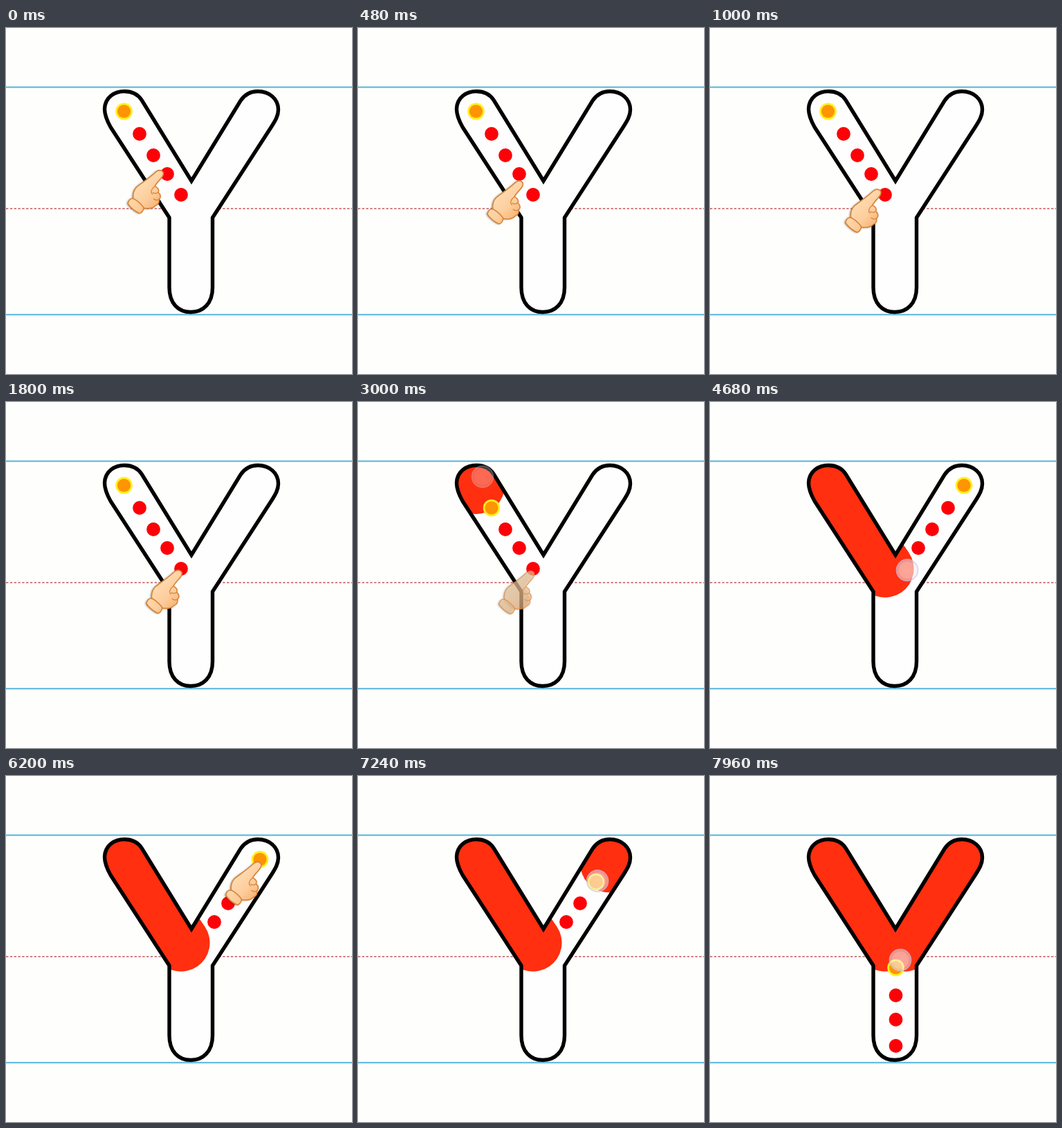
An HTML page with a canvas that plays this animation: 500 by 500 pixels, repeating every 8 s.

```html
<!DOCTYPE html>
<html lang="en">
<head>
<meta charset="utf-8">
<title>Letter tracing</title>
<style>
html, body { margin: 0; width: 100%; height: 100%; overflow: hidden; background: #fefefc; }
canvas { display: block; width: 100vw; height: 100vh; object-fit: contain; }
</style>
</head>
<body>
<canvas id="stage" width="500" height="500"></canvas>
<script>
const ctx = document.getElementById('stage').getContext('2d');
const LOOP = 8000;
const TAU = Math.PI * 2;
const BRUSH = 41.5;
const LAG = 30;

const letter = new Path2D(
  'M236 274 L151 143 C146 134 142.5 126 142.5 117 C143 100 157 91.5 171 91.5 ' +
  'C181 91.5 190 95 196 104 L268 221 L339 105 C345 96 354 91.5 364 91.5 ' +
  'C380 91.5 393.5 102 393.5 118 C393.5 127 389 134 384 142 L298.5 274 L298.5 375 ' +
  'C298.5 398 285 410.5 267 410.5 C249 410.5 236 398 236 375 Z');

// Hand shapes, relative to the top right of the fingertip
const cuff = new Path2D(
  'M-46 42 C-42 41 -30 52 -29 56 C-30 60 -33 64 -36 63 C-42 60 -49 54 -52 49 C-51 46 -49 42 -46 42 Z');
const palm = new Path2D(
  'M-11 3 C-6 -1 1 2 -1 8 C-2 12 -9 17 -13 24 C-9 26 -6 29 -8 33 C-4 36 -4 41 -7 43 ' +
  'C-6 47 -8 51 -12 52 C-16 57 -25 57 -31 55 L-44 43 C-45 36 -43 29 -39 25 C-33 20 -23 14 -11 3 Z');
const creases = new Path2D(
  'M-13 24 C-18 28 -20 33 -16 36 M-8 33 C-11 35 -14 35 -16 33 M-7 43 C-10 45 -13 44 -15 42');

// Each stroke: its dots, and the touch that traces it
const strokes = [
  { dots: [[170.5, 120.5], [193, 153], [213, 184], [233, 211], [253, 241]],
    from: [180, 108], to: [285, 243], show: 0, down: 2880, drag: 3680, done: 4640 },
  { dots: [[367, 120.5], [344, 153], [321, 184], [301, 211]], end: [281, 241],
    from: [372, 110], to: [275, 266], show: 4640, down: 6600, drag: 7000, done: 7900 },
  { dots: [[268.5, 277], [268.5, 317], [268.5, 352], [268.5, 390]],
    show: 7900, down: LOOP, drag: LOOP, done: LOOP }
];

const clamp = v => Math.min(1, Math.max(0, v));
const ramp = (t, a, b) => clamp((t - a) / (b - a));
const mix = (a, b, k) => [a[0] + (b[0] - a[0]) * k, a[1] + (b[1] - a[1]) * k];
const dist = (a, b) => Math.hypot(b[0] - a[0], b[1] - a[1]);

function disc([x, y], r, color) {
  ctx.fillStyle = color;
  ctx.beginPath();
  ctx.arc(x, y, r, 0, TAU);
  ctx.fill();
}

function rule(y, color, width, dash = []) {
  ctx.strokeStyle = color;
  ctx.lineWidth = width;
  ctx.setLineDash(dash);
  ctx.beginPath();
  ctx.moveTo(0, y);
  ctx.lineTo(500, y);
  ctx.stroke();
  ctx.setLineDash([]);
}

const touchAt = (s, t) => mix(s.from, s.to, ramp(t, s.drag, s.done));

// Distance of the touch along the line of the stroke
function progress(s, t) {
  const a = s.dots[0], b = s.end || s.dots[s.dots.length - 1];
  const p = touchAt(s, t), len = dist(a, b);
  return ((p[0] - a[0]) * (b[0] - a[0]) + (p[1] - a[1]) * (b[1] - a[1])) / len;
}

function drawFill(s, t) {
  if (t < s.down || !s.to) return;
  const a = s.dots[0], b = s.end || s.dots[s.dots.length - 1];
  const k = t >= s.done ? 1 : clamp((progress(s, t) - LAG) / dist(a, b));
  const p = mix(a, b, k);
  ctx.strokeStyle = '#ff2f0f';
  ctx.lineWidth = BRUSH * 2;
  ctx.lineCap = 'round';
  ctx.beginPath();
  ctx.moveTo(...a);
  ctx.lineTo(p[0] + 0.01, p[1]);
  ctx.stroke();
  ctx.lineCap = 'butt';
}

function drawDots(s, t) {
  if (t < s.show || t >= s.done) return;
  const reach = t < s.down ? -1 : Math.max(0, progress(s, t));
  const left = s.dots.filter(d => dist(s.dots[0], d) > reach);
  left.forEach((d, i) => {
    if (i) return disc(d, 9.9, '#fd0008');
    disc(d, 12.3, '#fff01c');
    disc(d, 9.6, '#ff9404');
  });
}

function drawHand([x, y], alpha) {
  if (alpha <= 0) return;
  ctx.save();
  ctx.globalAlpha = alpha;
  ctx.translate(x, y);
  ctx.lineJoin = 'round';
  ctx.lineWidth = 1.6;
  ctx.strokeStyle = '#d98538';
  const skin = ctx.createLinearGradient(-40, 22, -10, 52);
  skin.addColorStop(0, '#ffdcb2');
  skin.addColorStop(0.6, '#fdcd9c');
  skin.addColorStop(1, '#f7b577');
  ctx.fillStyle = skin;
  for (const part of [palm, cuff]) {
    ctx.shadowColor = 'rgba(60,50,40,.6)';
    ctx.shadowBlur = 3;
    ctx.shadowOffsetX = -1.5;
    ctx.shadowOffsetY = 0.5;
    ctx.fill(part);
    ctx.shadowColor = 'transparent';
    ctx.stroke(part);
  }
  ctx.lineWidth = 1.3;
  ctx.stroke(creases);
  ctx.restore();
}

function drawTouch([x, y], alpha) {
  if (alpha <= 0) return;
  ctx.save();
  ctx.globalAlpha = alpha;
  const glow = ctx.createRadialGradient(x, y, 0, x, y, 16);
  glow.addColorStop(0, 'rgba(255,240,236,.62)');
  glow.addColorStop(0.75, 'rgba(244,238,240,.6)');
  glow.addColorStop(1, 'rgba(225,225,240,.35)');
  disc([x, y], 15.5, glow);
  ctx.strokeStyle = 'rgba(200,200,232,.65)';
  ctx.lineWidth = 1.8;
  ctx.stroke();
  ctx.restore();
}

function drawHands(t) {
  const rest = (1 - ramp(t, 0, 2150)) ** 2;
  drawHand([255.5 - 27.5 * rest, 243 - 38.5 * rest], 1 - ramp(t, 2880, 3200));
  drawHand([369.5, 123], ramp(t, 5300, 5700) * (1 - ramp(t, 6600, 6840)));
}

function render(t) {
  ctx.fillStyle = '#fefefc';
  ctx.fillRect(0, 0, 500, 500);
  rule(85.5, '#58b4dc', 2);
  rule(414.3, '#58b4dc', 2);
  rule(261, '#c4585c', 1.6, [3.4, 2.4]);

  ctx.fillStyle = '#fefefe';
  ctx.fill(letter);
  ctx.save();
  ctx.clip(letter);
  strokes.forEach(s => drawFill(s, t));
  ctx.restore();
  ctx.strokeStyle = '#000';
  ctx.lineWidth = 5.4;
  ctx.lineJoin = 'miter';
  ctx.stroke(letter);

  strokes.forEach(s => drawDots(s, t));
  drawHands(t);
  for (const s of strokes) {
    if (!s.to) continue;
    const shown = ramp(t, s.down, s.down + 240) * (1 - ramp(t, s.done + 80, s.done + 320));
    drawTouch(touchAt(s, t), shown);
  }
}

const start = performance.now();
function tick() {
  render((performance.now() - start) % LOOP);
  requestAnimationFrame(tick);
}
tick();
</script>
</body>
</html>
```
